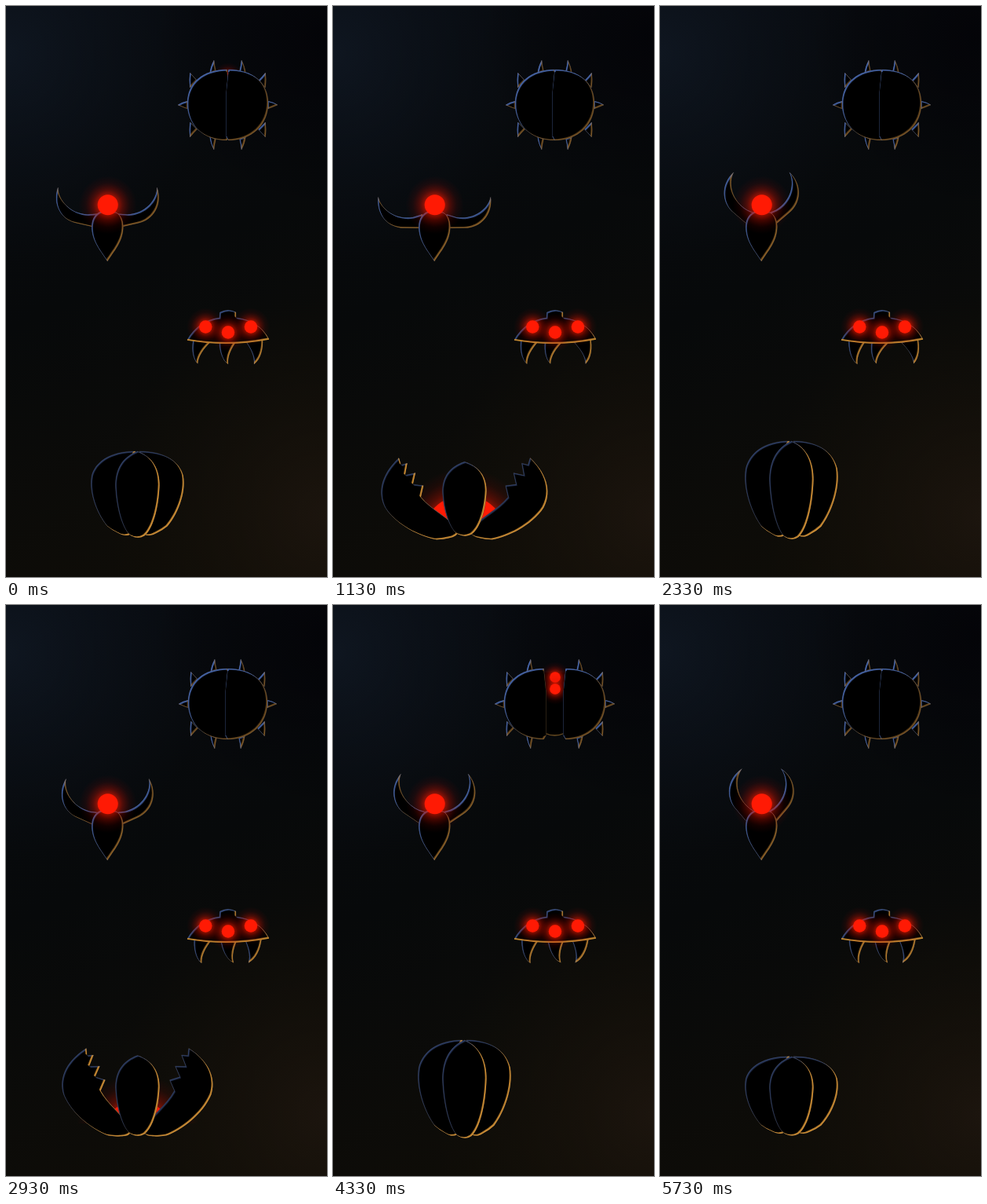
These frames come from a looping animation (409x727 px, 5.83 s). An HTML page with a canvas:

```html
<!DOCTYPE html>
<html lang="en">
<head>
<meta charset="utf-8">
<title>Night creatures</title>
<style>
html, body { margin: 0; width: 100%; height: 100%; overflow: hidden; background: #070909; }
canvas { display: block; width: 409px; height: 727px; }
</style>
</head>
<body>
<canvas id="stage"></canvas>
<script>
const W = 409, H = 727, LOOP = 5830, STEP = 1000 / 15, LAST = 86;
const canvas = document.getElementById('stage');
const ctx = canvas.getContext('2d');
const dpr = window.devicePixelRatio || 1;
canvas.width = W * dpr;
canvas.height = H * dpr;
ctx.scale(dpr, dpr);
ctx.lineJoin = 'round';

const deg = r => r * 180 / Math.PI;
const at = (x, y) => new DOMMatrix().translate(x, y);

// Linear interpolation through [time, value] pairs
function track(keys, t) {
  for (let i = 1; i < keys.length; i++) {
    const [a, va] = keys[i - 1], [b, vb] = keys[i];
    if (t <= b) return va + (vb - va) * (t - a) / (b - a);
  }
  return keys[keys.length - 1][1];
}

function fade(g, stops) {
  stops.forEach(([p, c]) => g.addColorStop(p, c));
  return g;
}

// Cool light falls from the top left, warm light from the bottom right
const COOL = fade(ctx.createLinearGradient(120, 40, 180, 700),
  [[0, 'rgba(84,122,205,.68)'], [0.4, 'rgba(74,106,178,.62)'], [1, 'rgba(58,78,128,.4)']]);
const WARM = fade(ctx.createLinearGradient(120, 40, 200, 700),
  [[0, 'rgba(150,105,50,.4)'], [0.4, 'rgba(184,126,50,.52)'], [0.8, 'rgba(228,156,55,.7)'], [1, 'rgba(232,160,60,.7)']]);

// Fill the sliver of a shape that its shifted copy leaves uncovered
function sliver(path, dx, dy, light) {
  const rest = new Path2D();
  rest.rect(-W, -H, W * 3, H * 3);
  rest.addPath(path, at(dx, dy));
  ctx.fillStyle = light;
  ctx.fill(rest, 'evenodd');
}

function shape(matrix, trace, lit = true) {
  const local = new Path2D();
  trace(local);
  local.closePath();
  const path = new Path2D();
  path.addPath(local, matrix);
  ctx.fillStyle = '#000';
  ctx.fill(path);
  if (!lit) return;
  ctx.strokeStyle = 'rgba(58,56,56,.5)';
  ctx.lineWidth = 1;
  ctx.stroke(path);
  ctx.save();
  ctx.clip(path);
  for (const k of [0.7, 1.4]) {
    sliver(path, 1.05 * k, 1.15 * k, COOL);
    sliver(path, -1.3 * k, -1.1 * k, WARM);
  }
  ctx.restore();
}

function glow(x, y, r, spread) {
  ctx.fillStyle = fade(ctx.createRadialGradient(x, y, r * 0.9, x, y, r + spread),
    [[0, 'rgba(255,25,0,.62)'], [0.3, 'rgba(215,18,0,.33)'], [0.65, 'rgba(180,8,0,.1)'], [1, 'rgba(160,0,0,0)']]);
  ctx.beginPath();
  ctx.arc(x, y, r + spread, 0, 7);
  ctx.fill();
  ctx.fillStyle = '#ff1a04';
  ctx.beginPath();
  ctx.arc(x, y, r, 0, 7);
  ctx.fill();
}

function wash(g, stops) {
  ctx.fillStyle = fade(g, stops);
  ctx.fillRect(0, 0, W, H);
}

function backdrop() {
  wash(ctx.createLinearGradient(40, 0, 370, H), [[0, '#080b10'], [0.45, '#07090a'], [1, '#100d07']]);
  wash(ctx.createRadialGradient(0, 60, 0, 0, 60, 270), [[0, 'rgba(16,24,35,.85)'], [1, 'rgba(12,18,27,0)']]);
  wash(ctx.createRadialGradient(W, 40, 0, W, 40, 220), [[0, 'rgba(3,3,7,.85)'], [1, 'rgba(3,3,7,0)']]);
  wash(ctx.createRadialGradient(W, 650, 0, W, 650, 280), [[0, 'rgba(30,22,15,.85)'], [1, 'rgba(22,17,8,0)']]);
}

// Spiked shell
const SHELL = [[0, 1], [100, 10], [230, 14], [340, 15.3], [450, 14.5], [600, 10],
  [700, 7], [730, 2.7], [790, 0], [4060, 0], [4100, 1]];
// base, tip, base
const SPIKES = [
  [-50, -5, -62.5, 0, -50, 5],
  [-47, -22, -47, -41, -38, -31],
  [-22, -40, -16.5, -57, -14, -43]
];

function spike(p, [ax, ay, tx, ty, bx, by]) {
  p.moveTo(ax, ay);
  p.quadraticCurveTo((ax + tx) / 2 - 1.5, (ay + ty) / 2 - 1, tx, ty);
  p.quadraticCurveTo((bx + tx) / 2 - 0.5, (by + ty) / 2, bx, by);
}

function halfShell(p) {
  p.moveTo(3, -14);
  p.lineTo(0, -45);
  p.bezierCurveTo(-30, -45, -50.5, -29, -50.5, -2);
  p.bezierCurveTo(-50.5, 25, -30, 45, 0, 45);
  p.lineTo(3, 40);
}

// Dark strip that keeps light off the seam
function seam(p) {
  p.moveTo(-4, -42);
  p.lineTo(0, -42);
  p.lineTo(3, -14);
  p.lineTo(3, 40);
  p.lineTo(-4, 42);
}

function shell(t) {
  const open = track(SHELL, t % 4100);
  const cx = 282.5, cy = 126;
  if (open > 0.3) {
    ctx.fillStyle = '#000';
    ctx.fillRect(cx - open, cy - 40, open * 2, 77);
    ctx.beginPath();
    ctx.moveTo(cx - 13, 163);
    ctx.quadraticCurveTo(cx, 169, cx + 13, 163);
    ctx.fill();
    ctx.strokeStyle = '#6d4f22';
    ctx.lineWidth = 1.3;
    ctx.stroke();
    glow(cx + 0.5, 92, 6.8, 13);
    glow(cx + 0.5, 107, 6.8, 13);
  }
  for (const side of [1, -1]) {
    const half = at(cx - side * open, cy).scale(side, 1);
    for (const s of SPIKES) {
      shape(half, p => spike(p, s));
      if (s[3]) shape(half.scale(1, -1), p => spike(p, s));
    }
    shape(half, halfShell);
    shape(half, seam, false);
  }
}

// Moth with folding wings
function wingAngle(t) {
  const p = (t - 138 + 1015) % 1015;
  if (p < 357) return -4 + 68 * Math.pow(1 - p / 357, 1.55);
  return -4 + 68 * (p - 357) / 658;
}

function wing(p) {
  p.moveTo(-7, -1);
  p.lineTo(-18, -22);
  p.bezierCurveTo(-28, -40, -20, -62, 1, -70);
  p.bezierCurveTo(-11, -60, -15, -37, -1, -19);
  p.lineTo(8, -10);
}

function mothBody(p) {
  p.moveTo(0, 325);
  p.bezierCurveTo(-8, 312, -20, 300, -20, 281);
  p.bezierCurveTo(-20, 271, -15, 264, -9, 262);
  p.lineTo(9, 262);
  p.bezierCurveTo(15, 264, 20, 271, 20, 281);
  p.bezierCurveTo(20, 300, 8, 312, 0, 325);
}

function moth(t) {
  const angle = wingAngle(t);
  for (const side of [1, -1]) {
    shape(at(129.3 - side * 10.3, 277).scale(side, 1).rotate(-angle), wing);
  }
  shape(at(129.3, 0), mothBody);
  glow(129.7, 253.3, 13, 24);
}

// Beetle with three swinging claws
function claw(p) {
  p.moveTo(-11, 6);
  p.bezierCurveTo(-12, 22, -8, 34, 0, 40);
  p.bezierCurveTo(-1, 30, 4, 20, 11, 10);
}

function dome(p) {
  p.moveTo(231, 425);
  p.bezierCurveTo(240, 409, 254, 399, 272, 397);
  p.lineTo(272.5, 390);
  p.quadraticCurveTo(283, 384.5, 293, 390);
  p.lineTo(293, 397);
  p.bezierCurveTo(312, 399, 326, 408, 335, 424);
  p.quadraticCurveTo(283, 434, 231, 425);
}

function beetle(t) {
  const phase = t * 2 * Math.PI / 1333;
  const swing = deg(0.183);
  const legs = [
    [251.5, 1, Math.cos(phase)],
    [283, 1, -Math.sin(phase)],
    [316, -1, Math.sin(phase)]
  ];
  for (const [x, side, a] of legs) {
    shape(at(x, 416).rotate(swing * a).scale(side, 1), claw);
  }
  shape(at(0, 0), dome);
  ctx.beginPath();
  ctx.moveTo(231, 425);
  ctx.quadraticCurveTo(283, 434, 335, 424);
  ctx.strokeStyle = '#c0872f';
  ctx.lineWidth = 1.6;
  ctx.stroke();
  glow(254.3, 408.5, 8.2, 16);
  glow(283, 415.5, 8.2, 16);
  glow(312, 408.5, 8.2, 16);
}

// Toothed flower
const SPREAD = [[0, -6.5], [660, -6.5], [730, 7], [800, 15], [1000, 31], [1200, 39],
  [1400, 45], [1530, 48], [1670, 50], [1730, -6.5], [2000, -6.5]];
const BUD = [[0, 1], [330, 1.136], [660, 1.136], [730, 1.03], [1000, 0.9], [1200, 0.84],
  [1530, 0.78], [1670, 0.765], [1730, 0.916], [2000, 1]];
const STRETCH = [[0, 0.88], [330, 1], [1670, 1], [1730, 0.806], [2000, 0.88]];
const TEETH = [[-14, -57], [-4, -68], [-15, -76], [-5, -87], [-18, -91], [-8, -103], [-16, -105], [-14, -114]];

function petal(p) {
  p.moveTo(8, 4);
  p.bezierCurveTo(4, -18, -10, -35, -14, -57);
  TEETH.forEach(([x, y]) => p.lineTo(x, y));
  p.bezierCurveTo(-47, -106, -60, -86, -60, -67);
  p.bezierCurveTo(-58, -40, -38, -12, -23, 0);
  p.quadraticCurveTo(-16, 4, -8, 6);
  p.quadraticCurveTo(2, 10, 8, 4);
}

function bud(p) {
  p.moveTo(0, -95.3);
  p.bezierCurveTo(-19, -88, -28, -73, -28, -52);
  p.bezierCurveTo(-27, -24, -19, 5, -8, 12);
  p.quadraticCurveTo(1, 17, 9, 12);
  p.bezierCurveTo(19, 4, 27, -22, 28, -52);
  p.bezierCurveTo(28, -73, 19, -88, 0, -95.3);
}

function flower(t) {
  const p = t % 2000;
  const spread = track(SPREAD, p);
  const cx = 167.5, base = 662.3;
  if (spread > 0) {
    ctx.save();
    ctx.beginPath();
    ctx.rect(60, 560, 215, 100);
    ctx.clip();
    glow(cx, 676, 55 * Math.min(1, 0.45 + spread / 70), 34);
    ctx.restore();
  }
  for (const side of [1, -1]) {
    const root = at(cx, base).scale(side, track(STRETCH, p));
    shape(root.translate(-15.5, 5.7).rotate(7 - spread), petal);
  }
  shape(at(cx, base).scale(1, track(BUD, p)), bud);
}

function draw(t) {
  backdrop();
  shell(t);
  moth(t);
  beetle(t);
  flower(t);
}

const start = performance.now();
function tick() {
  const t = (performance.now() - start) % LOOP;
  const n = Math.min(LAST, Math.floor((t + 6.7) / STEP));
  draw(n * STEP);
  requestAnimationFrame(tick);
}
draw(0);
requestAnimationFrame(tick);
</script>
</body>
</html>
```
